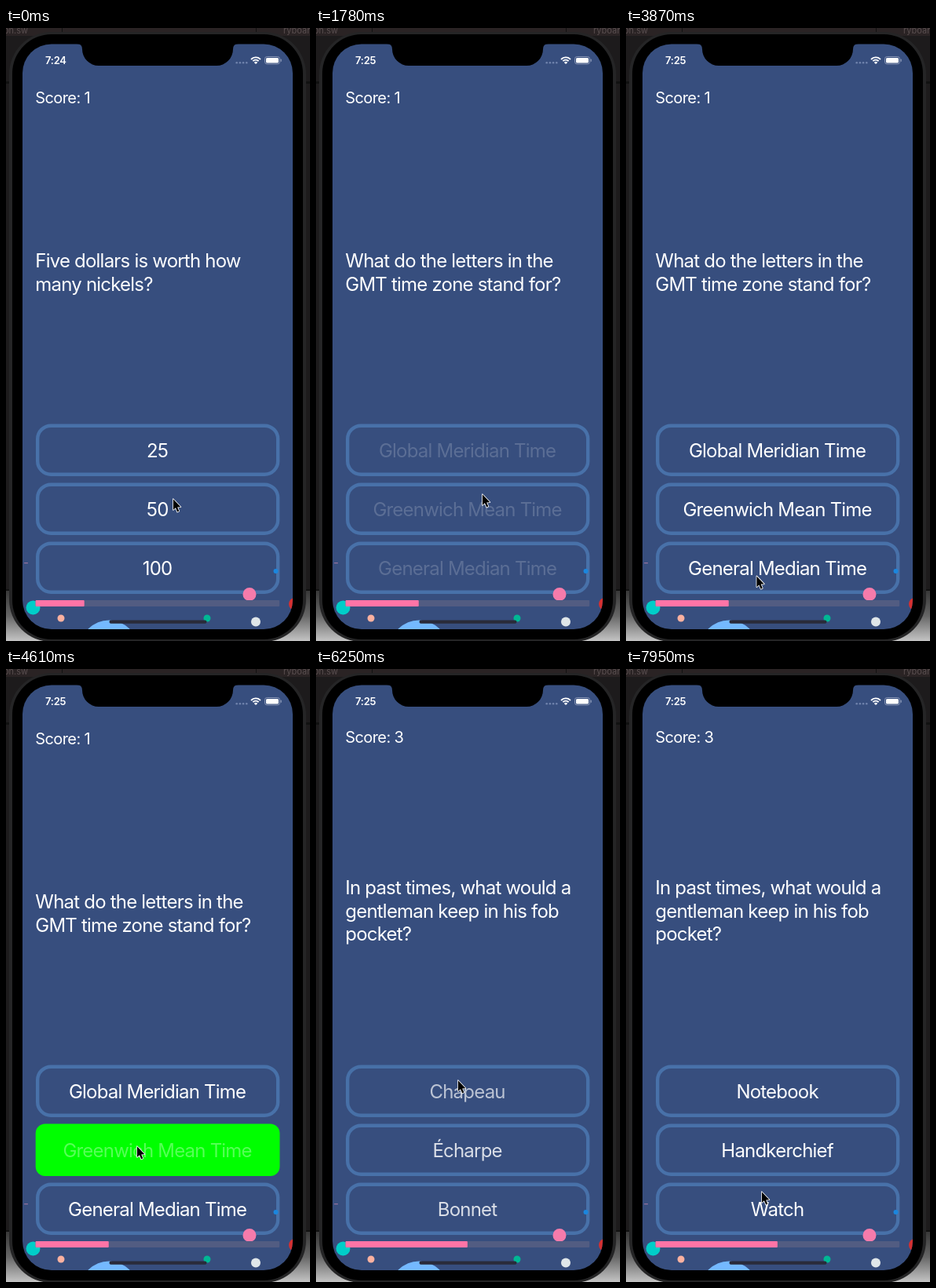
Animation of 387x781 px, one loop 8000 ms. Source, as an HTML page with a canvas:

```html
<!DOCTYPE html>
<html lang="en">
<head>
<meta charset="utf-8">
<title>Quiz</title>
<style>
  html, body { margin: 0; width: 100%; height: 100%; overflow: hidden; background: #1d1b1c; }
  canvas { display: block; width: 387px; height: 781px; }
</style>
</head>
<body>
<canvas id="stage"></canvas>
<script>
const W = 387, H = 781, LOOP = 8000;
const canvas = document.getElementById('stage');
const ctx = canvas.getContext('2d');
const scale = window.devicePixelRatio || 1;
canvas.width = W * scale;
canvas.height = H * scale;

const SCREEN = '#374e7e', BORDER = '#4871a9';
const UPDATE_DELAY = 205, FADE = 240;

const quiz = [
  { ask: ['Five dollars is worth how', 'many nickels?'], answers: ['25', '50', '100'], score: 1 },
  { ask: ['What do the letters in the', 'GMT time zone stand for?'],
    answers: ['Global Meridian Time', 'Greenwich Mean Time', 'General Median Time'], score: 1 },
  { ask: ['What is the French word for', "'hat'?"], answers: ['Chapeau', 'Écharpe', 'Bonnet'], score: 2 },
  { ask: ['In past times, what would a', 'gentleman keep in his fob', 'pocket?'],
    answers: ['Notebook', 'Handkerchief', 'Watch'], score: 3 }
];

// Each tap: press time, release time, button index, feedback colour
const taps = [
  { down: 1150, up: 1270, button: 1, color: '#ff0000' },
  { down: 4420, up: 4550, button: 1, color: '#00ff00' },
  { down: 5870, up: 5980, button: 0, color: '#00ff00' }
];

// Pointer path: time, x, y
const path = [
  [0, 212, 599], [80, 212, 599], [150, 211, 588], [230, 211, 593], [2970, 211, 593],
  [3000, 211, 590], [3230, 202.5, 559], [3360, 202.5, 559], [3510, 165, 711],
  [3690, 165, 711], [4070, 166, 682], [4220, 166, 682], [4400, 166, 607],
  [4900, 166, 607], [5000, 166, 602], [5690, 166, 602], [5850, 180, 523],
  [7700, 180, 523], [7850, 170, 605], [7950, 172, 665], [8000, 172, 665]
];

const clamp = v => Math.max(0, Math.min(1, v));
const smooth = v => { v = clamp(v); return v * v * (3 - 2 * v); };

function box(x, y, w, h, r, fill) {
  ctx.beginPath();
  ctx.roundRect(x, y, w, h, r);
  ctx.fillStyle = fill;
  ctx.fill();
}

function dot(x, y, r, fill) {
  ctx.beginPath();
  ctx.arc(x, y, r, 0, Math.PI * 2);
  ctx.fillStyle = fill;
  ctx.fill();
}

function label(str, x, y, size, { align = 'left', weight = 400, color = '#fff', track = -0.033 } = {}) {
  ctx.font = `${weight} ${size}px Inter, Roboto, sans-serif`;
  ctx.letterSpacing = `${track * size}px`;
  ctx.textAlign = align;
  ctx.fillStyle = color;
  ctx.fillText(str, x, y);
}

function drawDesktop() {
  ctx.fillStyle = '#1d1b1c';
  ctx.fillRect(0, 0, W, H);
  ctx.fillStyle = '#2a2324';
  ctx.fillRect(0, 0, W, 10);
  ctx.fillStyle = '#111';
  ctx.fillRect(71, 0, 1, 10);
  ctx.fillRect(318, 0, 1, 10);
  ctx.fillRect(0, 68, W, 3);
  ctx.fillRect(0, 715, W, 2);
  label('on.sw', -3, 6.5, 11, { color: '#5a4f50', track: 0 });
  label('ryboar', 353, 6.5, 11, { color: '#5a4f50', track: 0 });
  const floor = ctx.createLinearGradient(0, 717, 0, H);
  floor.addColorStop(0, '#383838');
  floor.addColorStop(0.5, '#666');
  floor.addColorStop(1, '#c4c4c4');
  ctx.fillStyle = floor;
  ctx.fillRect(0, 717, W, H - 717);
}

function screenPath() {
  ctx.beginPath();
  ctx.roundRect(21, 20.5, 344, 745.5, 37);
}

function drawPhone() {
  box(4, 5, 378, 777, 54, '#252526');
  box(8, 8, 370, 771, 50, '#000');
  screenPath();
  ctx.fillStyle = SCREEN;
  ctx.fill();
}

function drawNotch() {
  ctx.beginPath();
  ctx.moveTo(90, 19);
  ctx.lineTo(90, 20);
  ctx.quadraticCurveTo(97, 20, 97, 27);
  ctx.arcTo(97, 48, 118, 48, 21);
  ctx.lineTo(268, 48);
  ctx.arcTo(289, 48, 289, 27, 21);
  ctx.quadraticCurveTo(289, 20, 296, 20);
  ctx.lineTo(296, 19);
  ctx.fillStyle = '#000';
  ctx.fill();
}

function drawStatus(t) {
  label(t < 650 ? '7:24' : '7:25', 50, 46, 13, { weight: 600, track: -0.02 });
  for (let i = 0; i < 4; i++) dot(293.7 + i * 4.2, 44.3, 1.3, '#7083ad');
  ctx.strokeStyle = '#fff';
  ctx.lineWidth = 1.9;
  for (const r of [5, 8.2]) {
    ctx.beginPath();
    ctx.arc(318, 45.6, r, -Math.PI * 0.76, -Math.PI * 0.24);
    ctx.stroke();
  }
  ctx.beginPath();
  ctx.moveTo(318, 46);
  ctx.arc(318, 46, 3, -Math.PI * 0.76, -Math.PI * 0.24);
  ctx.fillStyle = '#fff';
  ctx.fill();
  ctx.beginPath();
  ctx.roundRect(329.5, 36.5, 19, 9.4, 2.8);
  ctx.strokeStyle = '#8795b5';
  ctx.lineWidth = 1;
  ctx.stroke();
  box(331, 38, 16, 6.4, 1.5, '#fff');
  box(349.6, 39.5, 1.3, 3.4, 0.7, '#8795b5');
}

function drawDecor() {
  ctx.save();
  screenPath();
  ctx.clip();
  dot(34.5, 738.5, 9, '#00cec9');
  dot(70, 752, 4.5, '#fab1a0');
  dot(131, 790.8, 36.4, '#74b9ff');
  dot(256, 752, 4.5, '#00b894');
  dot(318, 756.5, 6, '#dfe6e9');
  dot(310, 721.5, 8.5, '#f57bab');
  dot(343.5, 692, 3, '#1a86de');
  dot(368, 734, 8, '#d63031');
  box(23, 681, 5, 1.2, 0.5, '#93719c');
  ctx.restore();
}

function drawButton(i, t, page, titleAlpha) {
  const y = 504.5 + i * 75;
  let text = titleAlpha, edge = 1;
  for (const tap of taps) {
    if (tap.button !== i || t < tap.down) continue;
    const since = t - tap.up;
    text *= 0.2 + 0.8 * clamp(since / 350);
    edge *= clamp((since - 65) / 210);
    if (since >= 0 && since < UPDATE_DELAY) box(37.7, y, 310.8, 66.5, 12, tap.color);
  }
  ctx.globalAlpha = edge;
  ctx.beginPath();
  ctx.roundRect(40.2, y + 2.2, 306, 62, 17);
  ctx.strokeStyle = BORDER;
  ctx.lineWidth = 4.4;
  ctx.stroke();
  ctx.globalAlpha = text;
  label(quiz[page].answers[i], 192.6, y + 42.1, 24, { align: 'center' });
  ctx.globalAlpha = 1;
}

function drawPointer(t) {
  let k = 0;
  while (k < path.length - 2 && t >= path[k + 1][0]) k++;
  const [t0, x0, y0] = path[k], [t1, x1, y1] = path[k + 1];
  const p = clamp((t - t0) / (t1 - t0));
  ctx.save();
  ctx.translate(x0 + (x1 - x0) * p, y0 + (y1 - y0) * p);
  ctx.beginPath();
  ctx.moveTo(0.9, 1.2);
  for (const [x, y] of [[0.9, 15], [3.9, 12.3], [6.2, 17.6], [8.3, 16.6], [6.2, 11.4], [10.4, 11.2]]) ctx.lineTo(x, y);
  ctx.closePath();
  ctx.lineJoin = 'round';
  ctx.lineWidth = 1.6;
  ctx.strokeStyle = '#fff';
  ctx.stroke();
  ctx.fillStyle = '#000';
  ctx.fill();
  ctx.restore();
}

function draw(t) {
  ctx.setTransform(scale, 0, 0, scale, 0, 0);
  drawDesktop();
  drawPhone();
  drawNotch();
  drawStatus(t);

  const page = taps.filter(tap => t >= tap.up + UPDATE_DELAY).length;
  const { ask, score } = quiz[page];
  const tall = ask.length > 2;
  label(`Score: ${score}`, 37.3, tall ? 93.7 : 96, 20, { track: -0.03 });
  ask.forEach((line, i) => label(line, 37.3, (tall ? 287 : 304.8) + i * 29.7, 24));

  // Old titles fade out, then new ones fade in
  let shown = page, alpha = 1;
  if (page > 0) {
    const since = t - taps[page - 1].up - UPDATE_DELAY;
    if (since < FADE) {
      shown = page - 1;
      alpha = 1 - smooth(since / FADE);
    } else {
      alpha = smooth((since - FADE) / FADE);
    }
  }
  for (let i = 0; i < 3; i++) drawButton(i, t, shown, alpha);

  drawDecor();
  box(37.6, 729, 310.6, 8, 1, '#525c82');
  box(37.6, 729, 31.05 * (page + 2), 8, 1, '#ff74a6');
  box(131.5, 754.5, 124, 4.3, 2.1, '#292b3a');
  drawPointer(t);
}

function tick(now) {
  draw(now % LOOP);
  requestAnimationFrame(tick);
}
draw(0);
requestAnimationFrame(tick);
</script>
</body>
</html>
```
